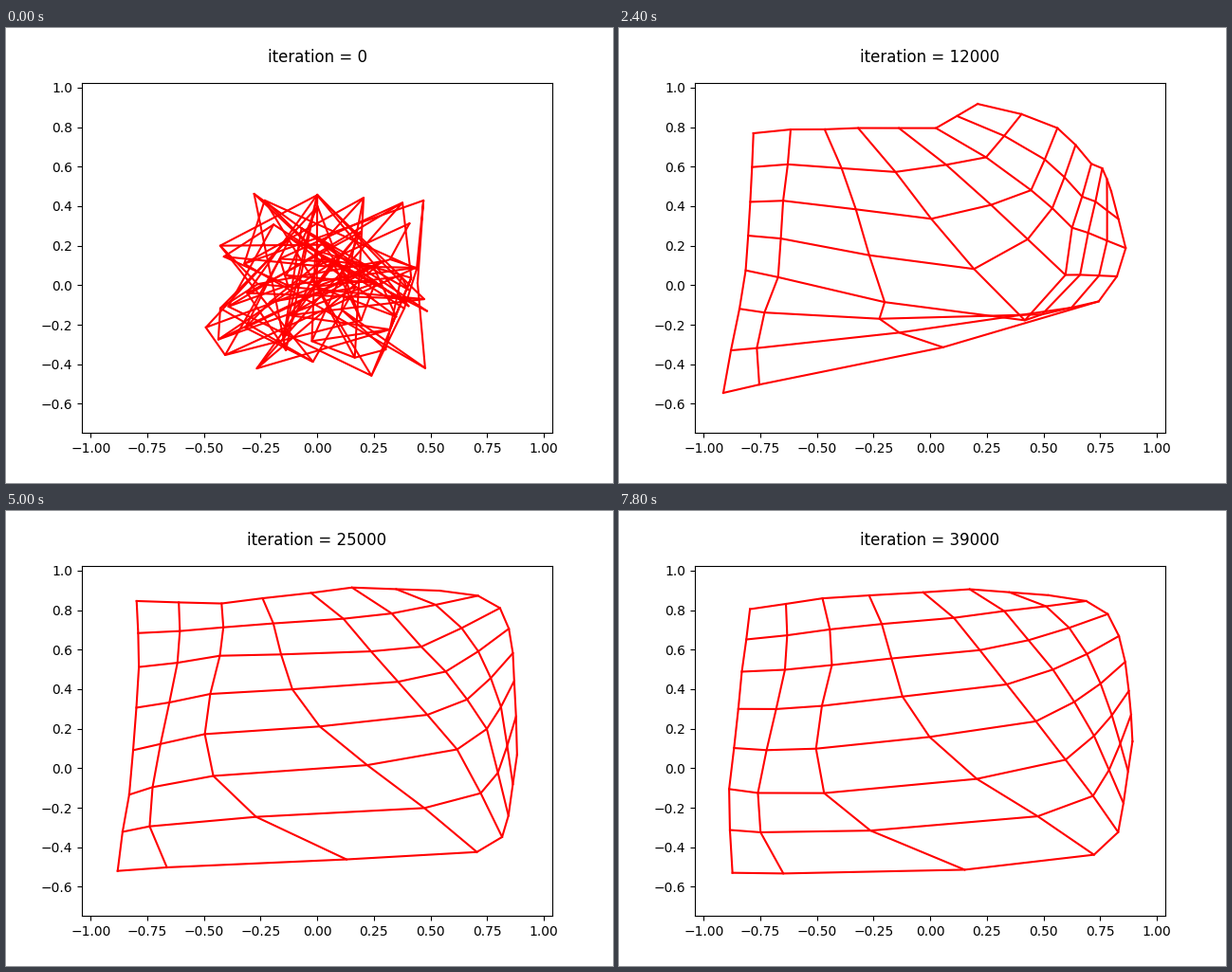
These frames come from a looping animation (640x480 px, 8000 ms). A matplotlib script:

```python
import numpy as np
import matplotlib.pyplot as plt
from matplotlib.animation import FuncAnimation

N = 8                   # the map is N x N nodes
FRAMES, STEP = 40, 200  # frames per loop, ms per frame
FOLD, FLAT = 8, 16      # steps at which the map is folded, then unfolded
X0, Y0, SX, SY = 328.15, 271.35, 238.8, 208.4  # data origin and unit in pixels


def weights(knots):
    """Linear weights that carry values at the knots to every row or column."""
    return np.array([np.interp(range(N), knots, row) for row in np.eye(len(knots))])


def spread(values, rows, cols):
    return np.einsum("ai,bj,abk->ijk", weights(rows), weights(cols), values)


def settled():
    """Sheet between two arms; lower rows cross the empty middle in one jump."""
    r, c = np.mgrid[:N, :N].astype(float)
    t = c / (N - 1)
    left_x, left_y = 137 - 0.45 * r**2, 102 + 33 * r + r**2
    right_x, right_y = 456 + 84 * (1 - np.exp(-0.6 * r)), 82 + 9.3 * r**1.5

    jump = 0.08 + 0.12 * r
    centre = 3.5 - 0.034 * r**2
    across = (1 - jump) * t + jump / (1 + np.exp(-2.3 * (c - centre)))
    rise = t ** (1.1 + 0.27 * r) * (1 + 1.6 * (r / 7) ** 4 * (1 - t))
    return np.stack([left_x + (right_x - left_x) * across,
                     left_y + (right_y - left_y) * rise], axis=-1)


def folded():
    """The right half is still turned over: a few key points, filled in between."""
    keys = np.array([
        [(139, 122), (173, 117), (226, 123), (294, 135), (299, 82)],
        [(137, 173), (157, 178), (357, 235), (431, 197), (407, 110)],
        [(136, 256), (175, 267), (530, 373), (480, 219), (457, 138)],
        [(113, 398), (130, 374), (512, 213), (536, 156), (510, 79)],
    ])
    return spread(keys, [0, 2, 4, 7], [0, 1, 3, 5, 7])


rng = np.random.default_rng(4)
TANGLE = [X0, Y0] + rng.uniform(-0.5, 0.5, (N, N, 2)) * [SX, -SY]
FOLDED, SETTLED = folded(), settled()
NOISE = rng.normal(0, 6, (FRAMES, 4, 4, 2))


def nodes(k):
    """Node positions in data units at step k."""
    if k <= FOLD:
        # The tangle opens almost at once.
        u = 1 - 0.15**k
        p = TANGLE * (1 - u) + FOLDED * u
    else:
        u = min(1, (k - FOLD) / (FLAT - FOLD))
        p = FOLDED * (1 - u) + SETTLED * u
    # Each batch of samples nudges the sheet a little.
    nudge = abs(np.sin(np.pi * k / FOLD)) if k <= FLAT else 1
    p = p + nudge * spread(NOISE[k], [0, 2, 5, 7], [0, 2, 5, 7])
    return (p[..., 0] - X0) / SX, (Y0 - p[..., 1]) / SY


fig, ax = plt.subplots(figsize=(6.4, 4.8), dpi=100)
ax.set_xlim((80 - X0) / SX, (576 - X0) / SX)
ax.set_ylim((Y0 - 427.2) / SY, (Y0 - 57.6) / SY)
title = fig.text(328 / 640, 1 - 36.1 / 480, "", size=12, ha="center", va="baseline")
rows = [ax.plot([], [], color="red", lw=1.5)[0] for _ in range(N)]
cols = [ax.plot([], [], color="red", lw=1.5)[0] for _ in range(N)]


def draw(k):
    x, y = nodes(k)
    for i in range(N):
        rows[i].set_data(x[i], y[i])
        cols[i].set_data(x[:, i], y[:, i])
    title.set_text(f"iteration = {k * 1000}")
    return [*rows, *cols, title]


anim = FuncAnimation(fig, draw, frames=FRAMES, interval=STEP,
                     repeat=True, repeat_delay=0, blit=False)
plt.show()
```
